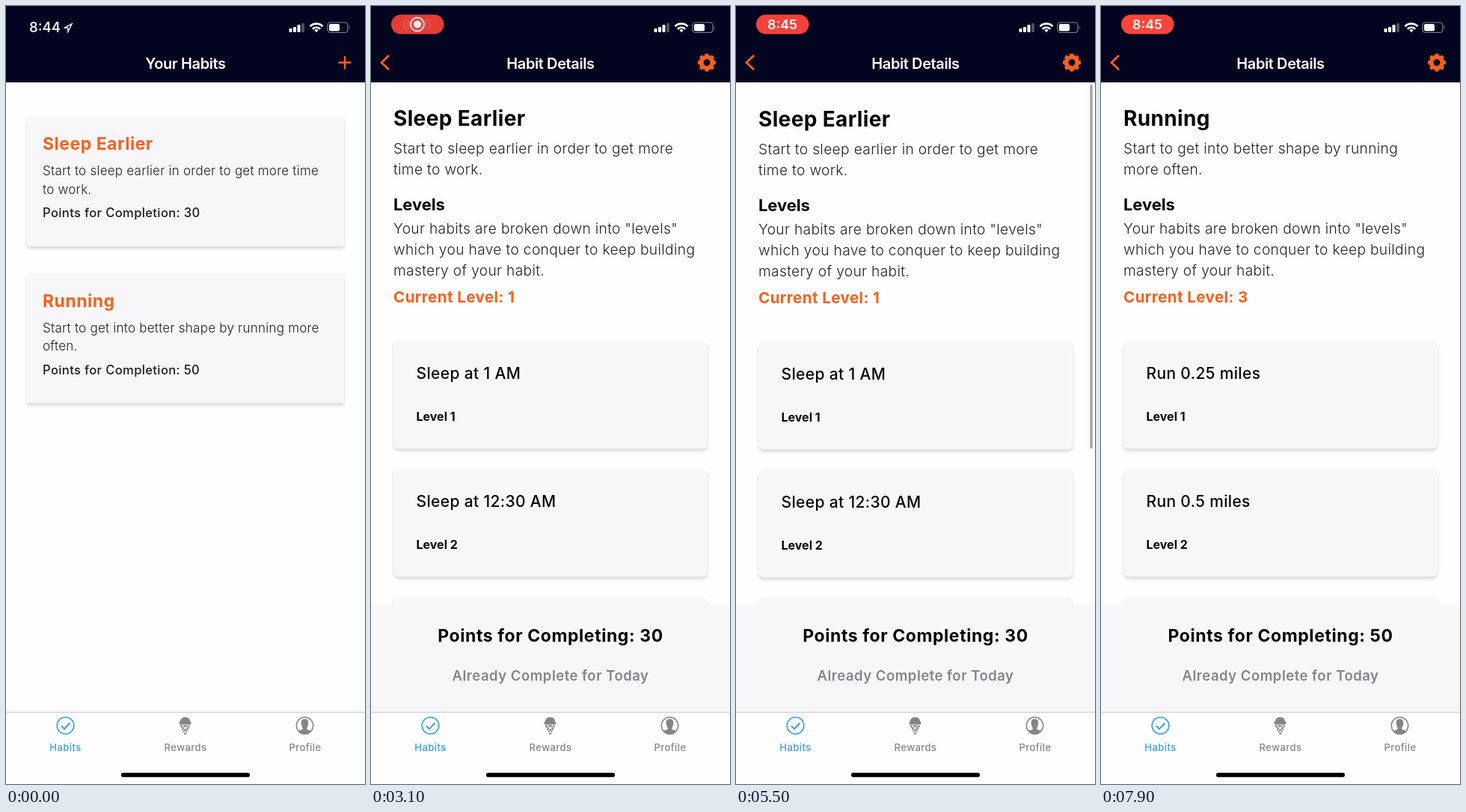
An HTML page for the animation above (8000 ms loop, 480x1039 px).

```html
<!DOCTYPE html>
<html lang="en">
<head>
<meta charset="utf-8">
<title>Habits</title>
<style>
  html, body { margin: 0; width: 100%; height: 100%; overflow: hidden; background: #fefdff; }
  svg { display: block; width: 100vw; height: 100vh; }
  text { font-family: Inter, "Open Sans", sans-serif; white-space: pre; }
  .card { fill: #f7f6f9; filter: drop-shadow(0 3px 2px rgba(0, 0, 0, .15)); }
</style>
</head>
<body>
<svg id="stage" viewBox="0 0 480 1039"></svg>
<script>
const LOOP = 8000, WIDTH = 480, MAX_SCROLL = 296;
const ORANGE = '#f8601d', NAVY = '#030420', PAPER = '#fefdff', PANEL = '#f7f6f9';
const GRAY = '#858489', BLUE = '#389fec';

const text = (x, y, size, weight, str, { fill = '#050507', anchor = 'start', gap = 0.35 } = {}) =>
  `<text x="${x}" y="${y}" font-size="${size}" font-weight="${weight}" fill="${fill}"
    text-anchor="${anchor}" letter-spacing="${gap}">${str}</text>`;
const rect = (x, y, w, h, fill, r = 0, extra = '') =>
  `<rect x="${x}" y="${y}" width="${w}" height="${h}" rx="${r}" fill="${fill}" ${extra}/>`;
const card = (x, y, w, h, r) => rect(x, y, w, h, PANEL, r, 'class="card"');
const lines = (x, y, step, size, rows, gap) =>
  rows.map((row, i) => text(x, y + i * step, size, 300, row, { fill: '#232327', gap })).join('');

const habitCard = (y, name, rows, points) =>
  card(28, y, 424, 173, 3) +
  text(49, y + 44, 23, 700, name, { fill: ORANGE, gap: 0.5 }) +
  lines(49, y + 78, 24.5, 17, rows, 0.24) +
  text(49, y + 134, 16.6, 500, 'Points for Completion: ' + points, { fill: '#1d1d20' });

const listPage = rect(0, 102, WIDTH, 841, PAPER) +
  habitCard(148, 'Sleep Earlier', ['Start to sleep earlier in order to get more time', 'to work.'], 30) +
  habitCard(357.5, 'Running', ['Start to get into better shape by running more', 'often.'], 50);

const levelCard = (title, i) => {
  const y = 447 + i * 171;
  return card(30, y, 420, 144, 7) + text(60.5, y + 51, 21, 500, title) +
    text(60.5, y + 107, 16, 700, 'Level ' + (i + 1), { gap: 0 });
};

const detailPage = (id, name, rows, level, steps, points) => `<g id="${id}">
  ${rect(0, 102, WIDTH, 841, PAPER)}
  <g class="content">
    ${text(30, 160, 28, 700, name)}
    ${lines(30, 196.5, 28, 19.2, rows, 0.33)}
    ${text(30, 273, 22, 700, 'Levels', { gap: -0.1 })}
    ${lines(30, 304, 27.8, 19.2, ['Your habits are broken down into "levels"',
      'which you have to conquer to keep building', 'mastery of your habit.'], 0.33)}
    ${text(30, 396, 20.6, 700, 'Current Level: ' + level, { fill: ORANGE, gap: 0.4 })}
    ${steps.map(levelCard).join('')}
    ${rect(30, 958, 420, 116, PANEL, 4)}
    ${text(239, 1023, 21, 300, 'Add Level', { anchor: 'middle', gap: 0.6 })}
  </g>
  <rect class="bar" x="473.3" width="3.4" rx="1.7" fill="#a3a2a6" opacity="0"/>
  ${rect(0, 800, WIDTH, 143, PANEL)}
  ${text(240, 849, 23, 700, 'Points for Completing: ' + points, { anchor: 'middle', gap: 0.58 })}
  ${text(240, 900.5, 18.5, 600, 'Already Complete for Today', { anchor: 'middle', fill: GRAY, gap: 0.5 })}
</g>`;

const title = (id, str) => `<g id="${id}">${text(240, 83.5, 20, 600, str,
  { fill: '#fff', anchor: 'middle', gap: -0.4 })}</g>`;

const header = rect(0, 0, WIDTH, 102, NAVY) + title('listTitle', 'Your Habits') +
  title('detailTitle', 'Habit Details') + `
  <path id="plus" d="M444.5 75.5h17M453 67v17" stroke="${ORANGE}" stroke-width="2.4"/>
  <g id="detailIcons" fill="none" stroke="${ORANGE}">
    <path d="M24 66 L14 75.5 L24 85" stroke-width="2.8"/>
    <circle cx="449" cy="75.5" r="7.4" stroke-width="5.8"/>
    <circle cx="449" cy="75.5" r="10.6" stroke-width="3" pathLength="16" stroke-dasharray="1.1 0.9"
      transform="rotate(-12.4 449 75.5)"/>
  </g>`;

const statusBar = `
  <g id="clock">
    ${text(31, 35, 18.3, 600, '8:44', { fill: '#e9e9ef', gap: 0 })}
    <path d="M77.5 29.3 L88 24 L83 34.3 L82.5 29.3 Z" fill="none" stroke="#e9e9ef" stroke-width="1.5"/>
  </g>
  <g id="pill">
    <rect id="pillBack" x="27" y="11.5" width="70.5" height="26" rx="13"/>
    <g id="record"><circle cx="62" cy="24.5" r="9" fill="none" stroke="#fff" stroke-width="1.8"/>
      <circle cx="62" cy="24.5" r="5" fill="#fff"/></g>
    <g id="pillClock">${text(62, 31, 17.8, 600, '8:45', { fill: '#fff', anchor: 'middle', gap: 0 })}</g>
  </g>
  ${[5, 7, 10, 12].map((h, i) => rect(378.5 + i * 5.5, 35 - h, 4, h, i < 3 ? '#fff' : '#50505f', 1)).join('')}
  <g fill="none" stroke="#fff" stroke-width="2.7">
    <path d="M406.5 27.2 a12 12 0 0 1 17 0 M409.8 30.7 a7.3 7.3 0 0 1 10.4 0"/>
    <path d="M412.3 32.3 a4 4 0 0 1 5.4 0 L415 35.2 Z" fill="#fff" stroke="none"/>
  </g>
  ${rect(430, 22, 27, 13.5, 'none', 4, 'stroke="#85858f" stroke-width="1.2"')}
  ${rect(432, 24, 14, 9.5, '#fff', 2)}
  <path d="M458.8 26.5 q2 2 0 4.5 Z" fill="#85858f"/>`;

const tab = (x, label, fill) => text(x, 994.5, 13.1, 500, label, { fill, anchor: 'middle', gap: 0.4 });
const tabBar = rect(0, 942.5, WIDTH, 97, PAPER) + rect(0, 942.5, WIDTH, 1.3, '#cdccd0') +
  tab(79.5, 'Habits', BLUE) + tab(240, 'Rewards', GRAY) + tab(400, 'Profile', GRAY) + `
  <g fill="none" stroke="${BLUE}" stroke-width="1.6">
    <circle cx="79.5" cy="961" r="11.3"/><path d="M74 961.5 l4 4 l7.5 -8" stroke-width="1.9"/>
  </g>
  <g fill="${GRAY}">
    <path d="M232.5 959.5 q-2.5 -2 .2 -4 a6.9 6.9 0 0 1 13.6 0 q2.7 2 .2 4 Z"/>
    <path d="M233.5 961 h12 L239.5 973 Z M233.5 961 l8 8 M245.5 961 l-8 8 M239.5 961 l-3 4 M239.5 961 l3 4"
      fill="none" stroke="${GRAY}" stroke-width="1.6" stroke-dasharray="2.2 1"/>
    <circle cx="399.5" cy="961" r="11.2" fill="none" stroke="${GRAY}" stroke-width="1.5"/>
    <path d="M399.5 952 c-4 0 -5.3 3 -4.6 7 c.3 3 1.6 4 1.9 6 c0 2 -4.8 2 -6 3.5
      a11 11 0 0 0 17.4 0 c-1.2 -1.5 -6 -1.5 -6 -3.5 c.3 -2 1.6 -3 1.9 -6 c.7 -4 -.6 -7 -4.6 -7Z"/>
  </g>` + rect(154, 1024, 172, 5.7, '#000', 2.8);

const $ = id => document.getElementById(id);
$('stage').innerHTML = rect(0, 0, WIDTH, 1039, PAPER) + `<g id="list">${listPage}</g>` +
  detailPage('sleep', 'Sleep Earlier', ['Start to sleep earlier in order to get more', 'time to work.'],
    1, ['Sleep at 1 AM', 'Sleep at 12:30 AM', 'Sleep at 12 AM'], 30) +
  detailPage('running', 'Running', ['Start to get into better shape by running', 'more often.'],
    3, ['Run 0.25 miles', 'Run 0.5 miles', 'Run 1 mile'], 50) +
  header + statusBar + tabBar;

const content = document.querySelector('#sleep .content');
const bar = document.querySelector('#sleep .bar');
const ramp = (t, from, to) => Math.min(1, Math.max(0, (t - from) / (to - from)));
const slide = (t, start) => 1 - (1 - ramp(t, start, start + 500)) ** 4;
const smooth = u => u * u * (3 - 2 * u);
const move = (el, x, y = 0) => el.setAttribute('transform', `translate(${x} ${y})`);
const fade = (el, opacity) => el.setAttribute('opacity', opacity);

function draw(t) {
  // Page stack: open, close, open the other habit
  const open = slide(t, 2300) - slide(t, 5900) + slide(t, 7000);
  const second = t >= 6800;
  move($('list'), -0.3 * WIDTH * open);
  move($('sleep'), second ? WIDTH : WIDTH * (1 - open));
  move($('running'), second ? WIDTH * (1 - open) : WIDTH);
  move($('listTitle'), -150 * open);
  move($('detailTitle'), 200 * (1 - open));
  for (const id of ['listTitle', 'plus']) fade($(id), 1 - open);
  for (const id of ['detailTitle', 'detailIcons']) fade($(id), open);

  // Scroll pulls past the end, then returns to the top
  const scroll = 330 * smooth(ramp(t, 3350, 4350)) - 331 * smooth(ramp(t, 4600, 5350));
  move(content, 0, -scroll);
  const over = Math.max(0, scroll - MAX_SCROLL);
  const top = 105 + Math.max(0, scroll - over) * 0.69 + over * 1.15;
  const bottom = Math.min(796, 592 + scroll * 0.69);
  bar.setAttribute('y', top);
  bar.setAttribute('height', bottom - top);
  fade(bar, ramp(t, 3350, 3450) - ramp(t, 5600, 5900));

  // Recording indicator
  const recording = ramp(t, 450, 650);
  fade($('clock'), 1 - recording);
  fade($('pill'), recording);
  const glow = 0.5 + 0.5 * Math.cos((t - 1900) / 1000 * Math.PI);
  $('pillBack').setAttribute('fill', `rgb(${224 + 31 * glow} ${60 + 9 * glow} ${53 + 6 * glow})`);
  const clockIn = ramp(t, 3050, 3500);
  fade($('record'), 1 - clockIn);
  fade($('pillClock'), clockIn);
}

function tick() {
  draw(performance.now() % LOOP);
  requestAnimationFrame(tick);
}
tick();
</script>
</body>
</html>
```
